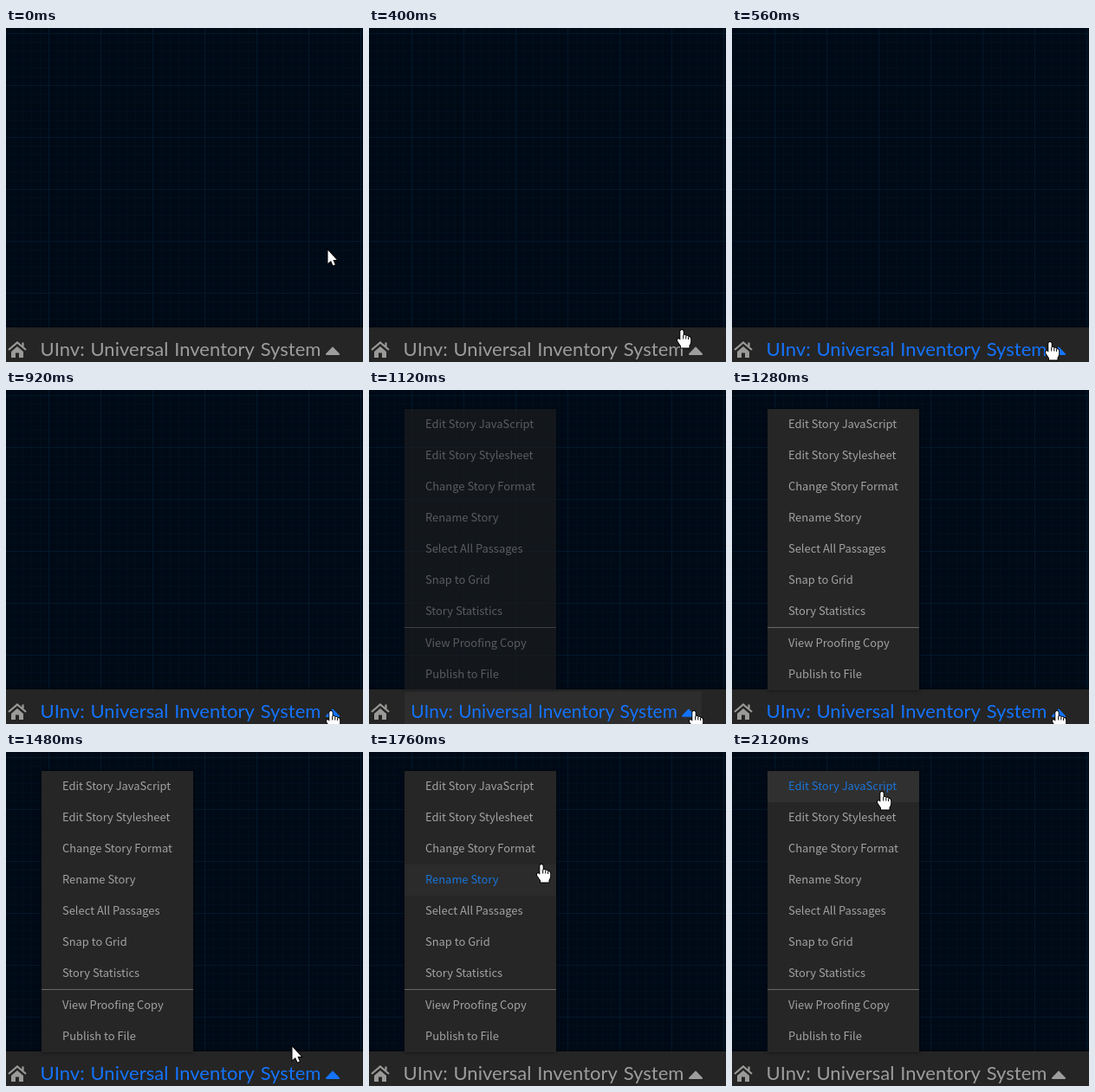
Animation, 412 px wide and 386 px high, one loop 2.76 s. Source, as an HTML page with a canvas:

```html
<!DOCTYPE html>
<html lang="en">
<head>
<meta charset="utf-8">
<style>
  html, body { margin: 0; width: 412px; height: 386px; overflow: hidden; background: #000a16; }
  canvas { display: block; }
</style>
</head>
<body>
<canvas id="stage" width="412" height="386"></canvas>
<script>
const ctx = document.getElementById('stage').getContext('2d');
const LOOP = 2760, STEP = 40;
const GREY = [157, 157, 157], BLUE = [20, 115, 252];
const MENU_FONT = '12.93px "Noto Sans CJK JP", "Noto Sans CJK SC", "Noto Sans", sans-serif';
const TITLE_FONT = '22px Lato, "Open Sans", sans-serif';
const ITEMS = ['Edit Story JavaScript', 'Edit Story Stylesheet', 'Change Story Format',
  'Rename Story', 'Select All Passages', 'Snap to Grid', 'Story Statistics',
  'View Proofing Copy', 'Publish to File'];

// Pointer waypoints: time, x, y
const PATH = [[0, 371, 256], [200, 371, 256], [400, 361, 349], [520, 366, 361],
  [760, 373, 370], [880, 373, 370], [920, 375, 371], [1280, 375, 371],
  [1440, 345, 357], [1480, 330, 340], [1600, 262, 243], [1700, 222, 165],
  [1760, 199, 130], [1960, 170, 49], [2040, 170, 49], [2120, 173, 46], [LOOP, 173, 46]];

const ARROW = new Path2D('M.5 .8V16L4 12.9L6.5 18.6L8.8 17.6L6.4 12H10.8Z');
const HAND = new Path2D('M-1.7 1.5Q-1.5 0 0 0Q1.5 0 1.7 1.5V6.2Q4.6 5.4 4.8 7Q7.3 6.4 7.6 8Q10 7.6 10.2 10' +
  'V14Q10 16 8.5 18V20.5H-1V18.5L-5 12.5Q-5.6 10-3.4 10.2L-1.7 11.8Z');
const KNUCKLES = new Path2D('M1.7 6V10.5M4.8 7V10.5M7.6 8V11');
const HOUSE = new Path2D('M6 374L13 368L20 374V381H15V375.5H11V381H6Z');
const ROOF = new Path2D('M3 372L13 363.5L23 372M19.5 363.5V368');
const CARET = new Path2D('M370 377L377 369.6L384 377Z');

const clamp = v => Math.max(0, Math.min(1, v));
const ramp = (t, from, to) => clamp((t - from) / (to - from));
const mix = (a, b, k) => `rgb(${a.map((v, i) => Math.round(v + (b[i] - v) * k))})`;
const rowTop = i => 22 + 36 * i + (i > 6 ? 1 : 0);

function box(color, x, y, w, h) {
  ctx.fillStyle = color;
  ctx.fillRect(x, y, w, h);
}

function pointer(t) {
  t = Math.max(0, t);
  const i = Math.max(1, PATH.findIndex(p => p[0] >= t));
  const [t0, x0, y0] = PATH[i - 1], [t1, x1, y1] = PATH[i];
  const k = ramp(t, t0, t1);
  return [x0 + (x1 - x0) * k, y0 + (y1 - y0) * k];
}

function overTitle(t) {
  const [x, y] = pointer(t);
  return y >= 347 && x > 32 && x < 393;
}

function hoveredRow(t) {
  const [x, y] = pointer(t);
  if (t < 1120 || x < 41 || x > 216) return -1;
  return ITEMS.findIndex((_, i) => y >= rowTop(i) && y < rowTop(i) + 36);
}

// Share of recent steps in which a hover test held: gives a linear fade
function fade(t, test) {
  let n = 0;
  for (let i = 1; i <= 4; i++) n += test(t - i * STEP);
  return n / 4;
}

function gridLines(color, gap) {
  for (let x = 49 % gap; x < 412; x += gap) box(color, x, 0, 1, 346);
  for (let y = 6; y < 346; y += gap) box(color, 0, y, 412, 1);
}

function drawGrid() {
  box('#000a16', 0, 0, 412, 386);
  gridLines('rgba(10,80,140,.06)', 10);
  gridLines('#03182b', 60);
}

function shadowBox(color, x, y, w, h) {
  ctx.shadowColor = 'rgba(0,0,0,.6)';
  ctx.shadowBlur = 4;
  box(color, x, y, w, h);
  ctx.shadowBlur = 0;
}

function drawBar(t) {
  shadowBox('#252525', 0, 346, 412, 60);
  ctx.fillStyle = ctx.strokeStyle = '#9a9a98';
  ctx.lineWidth = 2.2;
  ctx.fill(HOUSE);
  ctx.stroke(ROOF);

  const press = ramp(t, 960, 1120) * (1 - ramp(t, 1160, 1280));
  const scale = 1 - .05 * press;
  ctx.save();
  ctx.translate(212.5, 371);
  ctx.scale(scale, scale);
  ctx.translate(-212.5, -371);
  box(`rgba(48,48,48,${press * .75})`, 32, 347, 361, 48);
  ctx.fillStyle = ctx.strokeStyle = mix(GREY, BLUE, fade(t, overTitle));
  ctx.font = TITLE_FONT;
  ctx.letterSpacing = '.04px';
  ctx.wordSpacing = '1px';
  ctx.fillText('UInv: Universal Inventory System', 39.5, 379);
  ctx.lineWidth = 2;
  ctx.lineJoin = 'round';
  ctx.fill(CARET);
  ctx.stroke(CARET);
  ctx.restore();
}

function drawMenu(t) {
  ctx.save();
  ctx.globalAlpha = ramp(t, 1080, 1160);
  shadowBox('#262626', 41, 22, 175, 325);
  ctx.font = MENU_FONT;
  ITEMS.forEach((label, i) => {
    const y = rowTop(i);
    const glow = fade(t + STEP, s => hoveredRow(s) === i);
    box(`rgba(48,48,48,${glow})`, 41, y, 175, 36);
    ctx.fillStyle = hoveredRow(t) === i ? '#1a74d8' : '#a2a2a2';
    ctx.fillText(label, 65, y + 22);
  });
  box('#686868', 41, 274, 175, 1);
  ctx.restore();
}

function drawPointer(t) {
  const [x, y] = pointer(t).map(Math.round);
  const hand = overTitle(t) || hoveredRow(t) >= 0;
  const shape = hand ? HAND : ARROW;
  ctx.save();
  ctx.translate(x, y);
  ctx.strokeStyle = '#000';
  ctx.lineWidth = 1.8;
  ctx.stroke(shape);
  ctx.fillStyle = '#fff';
  ctx.fill(shape);
  ctx.lineWidth = 1;
  if (hand) ctx.stroke(KNUCKLES);
  ctx.restore();
}

const start = performance.now();
function draw() {
  const elapsed = Math.max(0, performance.now() - start) % LOOP;
  const t = Math.floor(elapsed / STEP) * STEP;
  drawGrid();
  drawBar(t);
  if (t >= 1120) drawMenu(t);
  drawPointer(t);
  requestAnimationFrame(draw);
}
draw();
</script>
</body>
</html>
```
